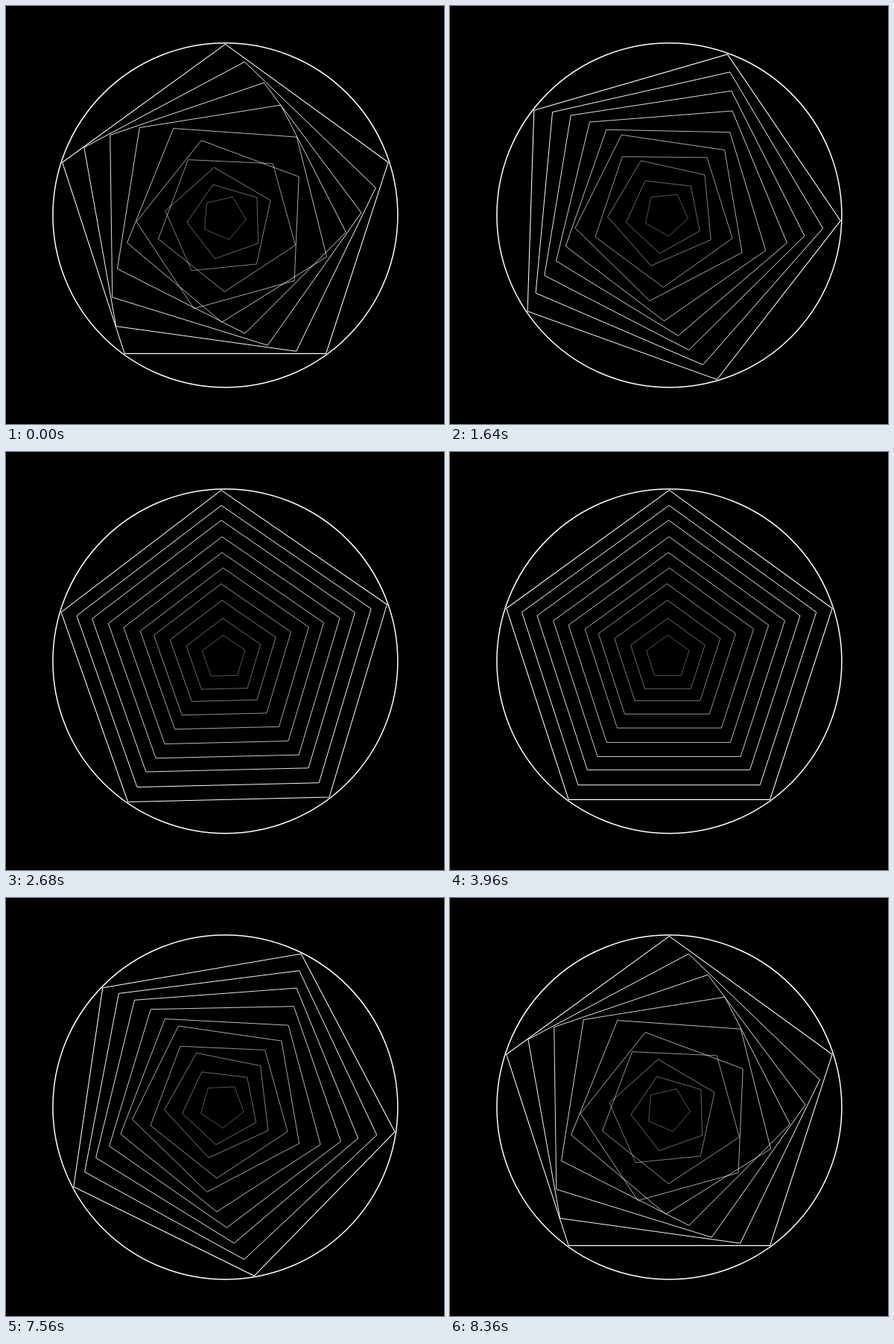
Animation of 588x562 px, one loop 9.44 s. Source, as an HTML page with a canvas:

```html
<!DOCTYPE html>
<html lang="en">
<head>
<meta charset="utf-8">
<title>Nested pentagons</title>
<style>
  html, body { margin: 0; width: 100%; height: 100%; overflow: hidden; background: #000; }
  canvas { display: block; }
</style>
</head>
<body>
<canvas id="stage" width="588" height="562"></canvas>
<script>
const ctx = document.getElementById('stage').getContext('2d');
const LOOP = 9440, CX = 294.4, CY = 281.3, RADIUS = 230, STEP = 22.2;
const TURN = 144;

// Per ring, outside in: twist in degrees, centre when twisted, centre when aligned
const rings = [
  [0, 0, 0, 0, 0],
  [7.9, -2.6, -0.4, -0.3, -1.7],
  [17.2, -3, -0.8, -0.9, -4],
  [26.9, 0.6, -2.4, -0.3, -4],
  [40, 5.2, 3, -1, -5],
  [56.5, -0.4, 14, 0, -6.5],
  [38.6, 3.4, 6.2, -3, -7.3],
  [66.3, -7.6, 10, -2.5, -7.4],
  [52.3, 1, 8.2, -2, -5.4],
  [22.8, -2, 3.2, -2, -5]
];

const rad = deg => deg * Math.PI / 180;
const mix = (a, b, k) => a + (b - a) * k;
const smooth = s => s * s * (3 - 2 * s);

function rotate(x, y, deg) {
  const c = Math.cos(rad(deg)), s = Math.sin(rad(deg));
  return [x * c - y * s, x * s + y * c];
}

// Bezier easing with handles (x1, 0) and (x2, 1)
function ease(t, start, length, x1, x2) {
  const u = Math.min(1, Math.max(0, (t - start) / length));
  let lo = 0, hi = 1;
  for (let i = 0; i < 24; i++) {
    const s = (lo + hi) / 2, r = 1 - s;
    if (3 * r * r * s * x1 + 3 * r * s * s * x2 + s * s * s < u) lo = s;
    else hi = s;
  }
  return u === 0 || u === 1 ? u : smooth(lo);
}

function pose(t) {
  if (t < 5000) {
    return {
      turn: -TURN * (1 - ease(t, 880, 2090, 0.33, 0.136)),
      twist: 1 - ease(t, 880, 1300, 0.63, 0.52)
    };
  }
  const k = ease(t, 7080, 1280, 1 / 3, 2 / 3);
  return { turn: -TURN * k, twist: k };
}

function pentagon(x, y, r, deg) {
  ctx.beginPath();
  for (let i = 0; i < 5; i++) {
    const [px, py] = rotate(0, -r, deg + 72 * i);
    ctx.lineTo(x + px, y + py);
  }
  ctx.closePath();
  ctx.stroke();
}

function draw(t) {
  const { turn, twist } = pose(t);
  ctx.fillStyle = '#000';
  ctx.fillRect(0, 0, 588, 562);
  ctx.strokeStyle = '#fff';
  ctx.lineWidth = 1.5;
  ctx.beginPath();
  ctx.arc(CX, CY, 231.5, 0, 2 * Math.PI);
  ctx.stroke();

  rings.forEach(([angle, bx, by, ax, ay], i) => {
    const [tx, ty] = rotate(bx, by, TURN);
    const [x, y] = rotate(mix(ax, tx, twist), mix(ay, ty, twist), turn);
    ctx.lineWidth = 1.05 - 0.08 * i;
    pentagon(CX + x, CY + y, RADIUS - STEP * i, turn + angle * twist);
  });
}

function frame() {
  draw(performance.now() % LOOP);
  requestAnimationFrame(frame);
}
frame();
</script>
</body>
</html>
```
